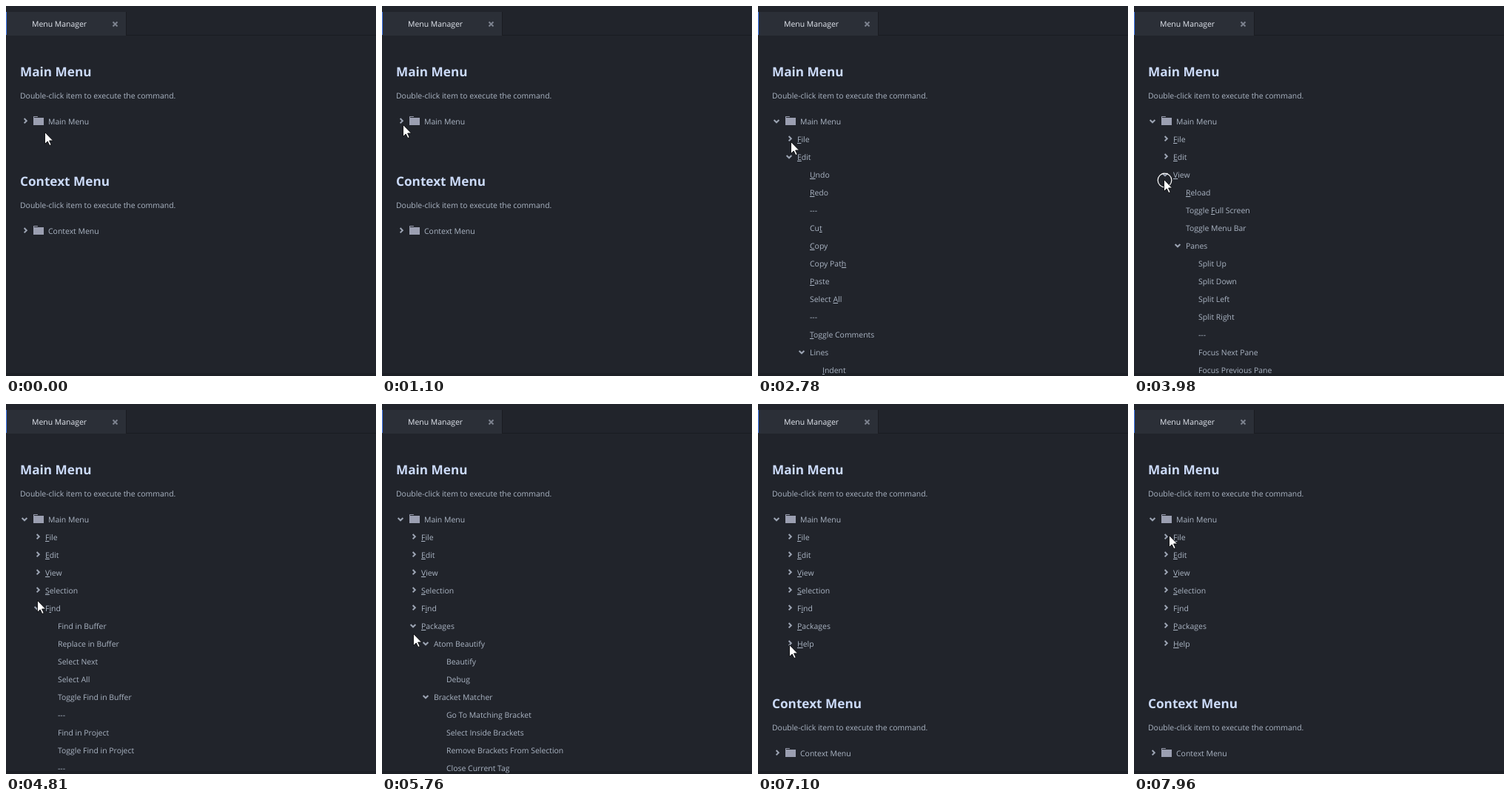
Animation of 500 by 500 pixels, one loop 8 s. Source, as an HTML page:

```html
<!DOCTYPE html>
<html lang="en">
<head>
<meta charset="utf-8">
<title>Menu Manager</title>
<style>
  html, body { margin: 0; width: 100%; height: 100%; overflow: hidden; background: #21242b; }
  svg { display: block; width: 100vw; height: 100vh; }
  text { font: 10.45px "Open Sans", "Noto Sans", sans-serif; fill: #abb5c4; text-rendering: geometricPrecision; white-space: pre; }
  .title { font-size: 17.2px; font-weight: 700; fill: #cbdaf8; }
  .tab { fill: #e4e8f0; }
  .key { text-decoration: underline; }
  .chev { fill: none; stroke: #9da5b4; stroke-width: 2; }
</style>
</head>
<body>
<svg viewBox="0 0 500 500">
  <rect width="500" height="500" fill="#21242b"/>
  <rect y="39" width="500" height="1" fill="#1a1c21"/>
  <rect y="8" width="163" height="32" fill="#1a1c21"/>
  <rect y="8" width="162" height="32" fill="#2b2f37"/>
  <rect y="8" width="1" height="31" fill="#447df2"/>
  <text class="tab" x="35" y="28">Menu Manager</text>
  <path d="M144.5 21.5l6 6m0-6l-6 6" stroke="#7c828e" stroke-width="2"/>
  <rect y="496" width="500" height="4" fill="#1d2026"/>
  <g id="page"></g>
  <g id="busy" fill="none">
    <circle cx="43" cy="158" r="6.5" fill="#7f98a8" fill-opacity=".5" stroke="#177f78" stroke-width="3"/>
    <path d="M37.2 160a6.2 6.2 0 0 0 11.6 0" stroke="#3fdcb8" stroke-width="2"/>
    <path d="M39 153.8a6 6 0 0 1 8 0" stroke="#a9c4d2" stroke-width="1.5"/>
  </g>
  <circle id="ring" cx="1.5" cy="1.5" r="9.3" fill="none" stroke="#fff" stroke-width="1.2"/>
  <path id="cursor" d="M.5 .5V16.5L4.2 13L6.9 18.6L9.2 17.5L6.6 12H11.6Z" fill="#fff" stroke="#0b0c0f" stroke-width=".9"/>
</svg>
<script>
const $ = id => document.getElementById(id);
const LOOP = 8000, TICK = 122, ROW = 24, TOP = 156;
const user = String.raw`C:\Users\lorven\.atom\packages\menu-manager` + "\\";

// "+" marks an open submenu, ">" an item inside it, "&" the underlined key
const menus = [
  ["&File", "New &Window", "&New File", "&Open File...", "Open Folder...", "Add Project Folder...",
    "+Open Recent", ">Reopen Closed File", ">---", `>${user}lib\\tree-view.coffee`,
    `>${user}lib\\menu-manager-page.coffee`, `>${user}lib\\menu-item.coffee`,
    `>${user}coffeelint.json`, `>${user}.editorconfig`],
  ["&Edit", "&Undo", "&Redo", "---", "Cu&t", "&Copy", "Copy Pat&h", "&Paste", "Select &All", "---",
    "&Toggle Comments", "+Lines", ">&Indent"],
  ["&View", "&Reload", "Toggle &Full Screen", "Toggle Menu Bar", "+Panes", ">Split Up", ">Split Down",
    ">Split Left", ">Split Right", ">---", ">Focus Next Pane", ">Focus Previous Pane"],
  ["&Selection", "Add Selection &Above", "Add Selection &Below", "S&plit into Lines", "Single Selection",
    "---", "Select to &Top", "Select to Botto&m", "---", "Select &Line", "Select &Word"],
  ["F&ind", "Find in Buffer", "Replace in Buffer", "Select Next", "Select All", "Toggle Find in Buffer",
    "---", "Find in Project", "Toggle Find in Project", "---"],
  ["&Packages", "+Atom Beautify", ">Beautify", ">Debug", "+Bracket Matcher", ">Go To Matching Bracket",
    ">Select Inside Brackets", ">Remove Brackets From Selection", ">Close Current Tag"],
  ["&Help", "View &Terms of Use", "View &License", "Version 1.0.0", "Restart and Install Update",
    "Check for Update", "Checking for Update", "Downloading Update"]
];

// Each click shows the ring, then folds one menu and reveals the next
const clicks = [1470, 2660, 3400, 3980, 4570, 5170, 6240, 6980];
const HOLD = 120;

// Cursor legs: start time, number of ticks, end point
const legs = [
  [0, 1, 52, 170], [490, 4, 29, 161], [1100, 1, 28, 160], [2210, 1, 38, 169], [2450, 1, 44, 183],
  [2905, 3, 42, 201], [3635, 2, 40, 234], [4228, 2, 41, 255], [4810, 2, 42, 274],
  [5410, 4, 42, 316], [5880, 3, 42, 295], [6488, 3, 42, 325], [7350, 6, 47, 177]
];
const ease = p => (1 - Math.cos(Math.PI * p)) / 2;

function cursorAt(t) {
  let x = 0, y = 0;
  for (const [start, ticks, toX, toY] of legs) {
    if (t < start) break;
    const p = ease(Math.min(1, (Math.floor((t - start) / TICK) + 1) / ticks));
    x += (toX - x) * p;
    y += (toY - y) * p;
  }
  return [Math.round(x), Math.round(y)];
}

const label = s => s.replace(/&(.)/, '<tspan class="key">$1</tspan>');
const text = (x, y, s, cls = "") => `<text class="${cls}" x="${x}" y="${y}">${label(s)}</text>`;

function chevron(level, y, open) {
  const x = 25 + 17 * level;
  const d = open ? `M${x - 3.4} ${y - 2}l3.4 3.3l3.4 -3.3` : `M${x - .4} ${y - 4}l3.2 3.2l-3.2 3.2`;
  return `<path class="chev" d="${d}"/>`;
}

function section(name, y, open) {
  const folder = `<path d="M37 ${y - 6.5}l.5 -.5h5l.5 .5v1.5h8v10h-14z" fill="#9b9fb1"/>` +
    `<path d="M38 ${y - 5.5}h5" stroke="#21242b"/>`;
  return text(19, y - 61, name, "title") +
    text(19, y - 31, "Double-click item to execute the command.") +
    chevron(0, y, open) + folder + text(57, y + 4, name);
}

function page(current) {
  const expanded = current >= 0;
  let out = section("Main Menu", TOP, expanded), y = TOP;
  const add = (level, s, open) => {
    y += ROW;
    if (open !== undefined) out += chevron(level, y, open);
    out += text(36 + 17 * level, y + 4, s);
  };
  if (expanded) {
    menus.slice(0, current + 1).forEach(([name, ...items], i) => {
      add(1, name, i === current);
      if (i < current) return;
      for (const item of items) {
        if (item[0] === "+") add(2, item.slice(1), true);
        else if (item[0] === ">") add(3, item.slice(1));
        else add(2, item);
      }
    });
  }
  if (!expanded || current === menus.length) out += section("Context Menu", y + 148, false);
  return out;
}

const show = (el, on) => el.setAttribute("visibility", on ? "visible" : "hidden");
let shown = null;

function draw(t) {
  const current = clicks.filter(at => at + HOLD <= t).length - 1;
  if (current !== shown) {
    $("page").innerHTML = page(current);
    shown = current;
  }
  const place = `translate(${cursorAt(t)})`;
  $("cursor").setAttribute("transform", place);
  $("ring").setAttribute("transform", place);
  show($("ring"), clicks.some(at => t >= at && t < at + HOLD));
  // The app is briefly busy after the first click
  const since = t - clicks[0] - HOLD;
  show($("busy"), since >= 0 && since < 130);
}

const start = performance.now();
function tick() {
  draw((performance.now() - start) % LOOP);
  requestAnimationFrame(tick);
}
tick();
</script>
</body>
</html>
```
